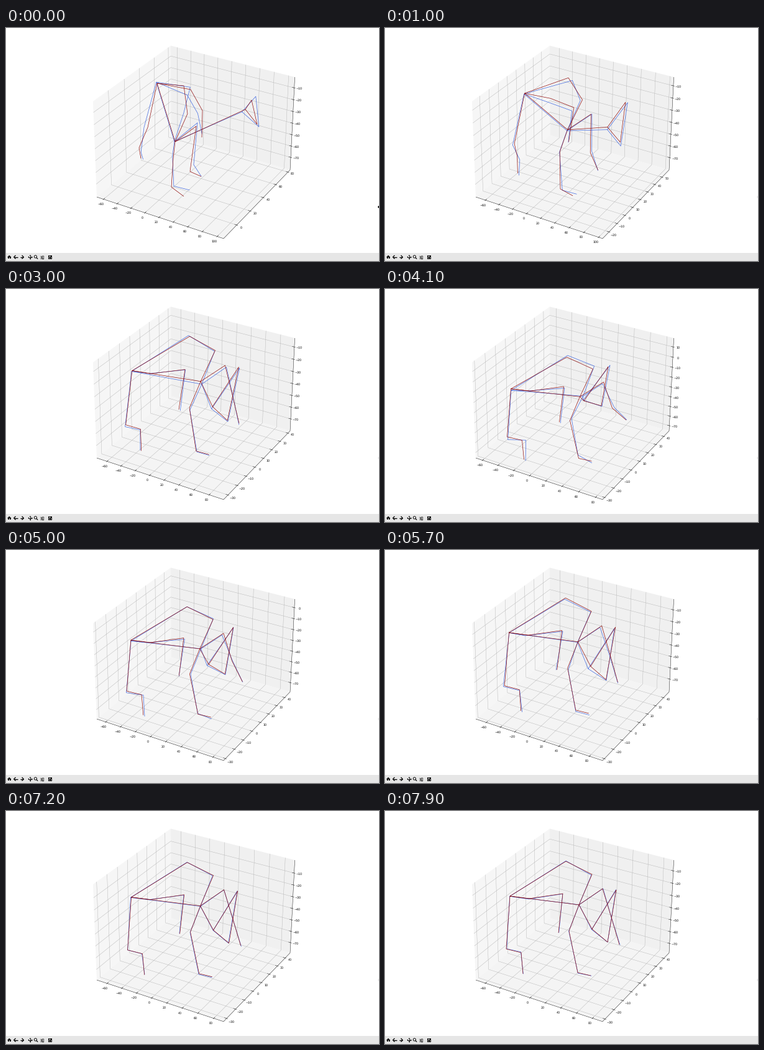
Recreate the animation shown at these times as a matplotlib script. Size 600 by 375 pixels, loop 8000 ms.

```python
import math
import numpy as np
import matplotlib.pyplot as plt
from matplotlib.animation import FuncAnimation
from matplotlib.collections import LineCollection
from matplotlib.patches import Circle, Polygon, Rectangle

W, H, DPI = 600, 375, 100
FRAMES, INTERVAL = 80, 100
PT = 72 / DPI
FONT_SIZE = 3.4
plt.rcParams["text.hinting"] = "none"

# Perspective box: origin corner, then vanishing point and weight per axis
ORIGIN = np.array([146.0, 272.0])
VANISH = np.array([[-3523, -931], [1522, -871.5], [280, 3711]], float)
WEIGHT = np.array([-0.05267, 0.0952, -0.04286])

# Joint letters: body ABCD, front leg HIJ and KLM, hind leg EFG and NOS, head RPQ
JOINTS = "ABCDHIJKLMEFGNOSRPQ"
CHAINS = ["ABCDA", "AHIJ", "AKLM", "DEFG", "DNOS", "DRPQR"]

STRIDE = np.array([
    (243, 89), (286, 93), (292, 138), (272, 183),
    (228, 160), (214, 193), (217, 210), (297, 99), (316, 133), (315, 176),
    (269, 210), (266, 256), (286, 271), (306, 158), (296, 231), (314, 239),
    (385, 131), (404, 155), (395, 116)], float)
STAND = np.array([
    (201, 137), (291, 81), (333, 102), (312, 151),
    (195, 222), (219, 228), (222, 262), (231, 141), (286, 133), (279, 196),
    (296, 193), (310, 260), (331, 265), (350, 125), (364, 171), (377, 215),
    (333, 190), (358, 211), (372, 127)], float)

rng = np.random.default_rng(4)
times, limit_keys, red_keys, blue_keys = [], [], [], []


def project(u, v, w):
    k = WEIGHT * (u, v, w)
    return (ORIGIN + k @ VANISH) / (1 + k.sum())


def sway(pose, amount):
    """Lean the figure forward and up."""
    x, y = pose.T
    lean = np.stack([0.14 * (174 - y), 0.075 * x + 0.08 * y - 42], axis=1)
    return pose + amount * lean


def crouch(pose):
    """Press the body down while the head comes up."""
    low = pose + np.stack([np.full(len(pose), 1.5),
                           36 - 0.09 * pose[:, 1]], axis=1)
    low[JOINTS.index("S")] = 388, 211
    low[JOINTS.index("R"):] = (320, 180), (348, 188), (359, 125)
    return low


def key(time, pose, limits, lean, spread):
    """The blue figure follows the red one with a lean and a random error."""
    times.append(time)
    limit_keys.append(np.array(limits))
    red_keys.append(pose)
    error = np.clip(rng.normal(0, spread, pose.shape), -2 * spread, 2 * spread)
    blue_keys.append(pose + lean + error)


key(0, STRIDE, [(-70.1, 108.5), (-18.7, 83.6), (-81.2, -1.05)], (2, -1), 5)
key(20, sway(STAND, 1), [(-78.6, 102), (-37, 36.7), (-80, -5)], (1, 4.5), 2)
key(30, sway(STAND, 0.35), [(-74.7, 98.8), (-34.7, 42.8), (-80.4, -2.85)],
    (0.5, 1.5), 1.5)
key(41, crouch(STAND), [(-68.9, 88.2), (-32.2, 47), (-75.5, 18.7)],
    (1, -0.5), 2.5)
key(57, sway(STAND, 0.1) - (2, 2.5),
    [(-75.1, 97), (-32, 47.3), (-81.5, -1)], (-1, 1.5), 1.5)
key(67, STAND + (1, 3), [(-75, 92), (-33.8, 46.1), (-79.9, 2.35)],
    (-0.7, 0.3), 0.8)
key(79, STAND, [(-73.3, 92.5), (-32.7, 46.9), (-78.1, -1.44)],
    (-0.3, 0.3), 0.8)

fig = plt.figure(figsize=(W / DPI, H / DPI), dpi=DPI, facecolor="white")
ax = fig.add_axes([0, 0, 1, 1])
ax.set_xlim(0, W)
ax.set_ylim(H, 0)
ax.axis("off")


def shape(points, color="black", z=9):
    ax.add_patch(Polygon(points, closed=True, fc=color, ec="none", zorder=z))


def block(x, y, w, h, color="black", z=9):
    ax.add_patch(Rectangle((x, y), w, h, fc=color, ec="none", zorder=z))


def stroke(points, width, color="black", z=9):
    xs, ys = zip(*points)
    ax.plot(xs, ys, color=color, lw=width * PT, zorder=z,
            solid_capstyle="butt")


def collection(color, width, z):
    lines = LineCollection([], colors=color, linewidths=width * PT, zorder=z)
    return ax.add_collection(lines, autolim=False)


def draw_box():
    left, front, right = project(0, 0, 0), project(1, 0, 0), project(1, 1, 0)
    back = project(0, 1, 0)
    left_top, back_top = project(0, 0, 1), project(0, 1, 1)
    right_top = project(1, 1, 1)
    shape([left, back, back_top, left_top], "0.965", 1)
    shape([back, right, right_top, back_top], "0.942", 1)
    shape([left, front, right, back], "0.955", 1)
    stroke([left, front, right, right_top], 0.45, z=3)


def draw_toolbar():
    block(0, 362, W, 13, "#e6e6e6", 8)
    y = 368.7
    # home
    shape([(2, y + 0.3), (5.3, y - 3), (8.6, y + 0.3)])
    block(3.2, y, 1.6, 2.7)
    block(5.9, y, 1.6, 2.7)
    # back and forward arrows
    for x, d in ((15.5, -1), (25.6, 1)):
        stroke([(x - 3 * d, y), (x + 2.6 * d, y)], 1.3)
        stroke([(x, y - 2.8), (x + 2.8 * d, y), (x, y + 2.8)], 1.3)
    # pan
    stroke([(36, y), (42, y)], 0.9)
    stroke([(39, y - 3), (39, y + 3)], 0.9)
    for dx, dy in ((1, 0), (0, 1), (-1, 0), (0, -1)):
        shape([(39 + a * dx - b * dy, y + a * dy + b * dx)
               for a, b in ((3.6, 0), (2, 1.5), (2, -1.5))])
    # zoom
    ax.add_patch(Circle((47.4, y - 0.7), 2.1, fc="none", ec="black",
                        lw=0.9 * PT, zorder=9))
    stroke([(48.9, y + 0.8), (51.2, y + 3)], 1.2)
    # sliders
    for dy, knob in ((-2.2, 59.3), (0, 56.8), (2.2, 58.8)):
        stroke([(55, y + dy), (61, y + dy)], 0.7)
        stroke([(knob, y + dy - 0.9), (knob, y + dy + 0.9)], 1)
    # save
    block(68.2, y - 3, 6, 6)
    block(69.2, y - 2.1, 3.2, 1.4, "#e6e6e6", 10)
    block(69.2, y + 0.2, 4, 2, "#e6e6e6", 10)
    block(70.4, y + 0.6, 1.5, 1.6, z=11)


draw_box()
draw_toolbar()
grid = collection("#b0b0b0", 0.42, 2)
ticks = collection("black", 0.45, 3)
blue_lines = collection("royalblue", 0.7, 5)
red_lines = collection("darkred", 0.65, 6)
pointer = ax.add_patch(Circle((600, 288), 1.8, ec="none", zorder=9))
labels = [ax.text(0, 0, "", fontsize=FONT_SIZE, family="DejaVu Sans",
                  ha="center", va="center", zorder=4) for _ in range(40)]

# Per axis: grid line path, tick ends and label offset for a fraction s
GRID = [lambda s: [(s, 0, 0), (s, 1, 0), (s, 1, 1)],
        lambda s: [(1, s, 0), (0, s, 0), (0, s, 1)],
        lambda s: [(1, 1, s), (0, 1, s), (0, 0, s)]]
TICK = [lambda s: [(s, -0.009, 0), (s, 0.017, 0)],
        lambda s: [(1.009, s, 0), (0.983, s, 0)],
        lambda s: [(1.009, 1, s), (0.983, 1, s)]]
OFFSET = [lambda s: (-4.3, 8),
          lambda s: (7.5, 5.5 - 3 * s),
          lambda s: (8, 1.5)]


def blend(keys, frame):
    i = min(int(np.searchsorted(times, frame, side="right")) - 1,
            len(times) - 2)
    f = (frame - times[i]) / (times[i + 1] - times[i])
    return keys[i] * (1 - f) + keys[i + 1] * f


def segments(pose):
    return [pose[[JOINTS.index(j) for j in chain]] for chain in CHAINS]


def tick_values(axis, low, high):
    step = 20 if axis == 0 or high - low > 95 else 10
    pad = (high - low) / 50
    return range(math.ceil((low + pad) / step) * step,
                 math.floor(high - pad) + 1, step)


def update(frame):
    # the motion pauses briefly here
    moment = 54 if 54 <= frame < 57 else frame
    grid_paths, tick_paths, texts = [], [], []
    for axis, (low, high) in enumerate(blend(limit_keys, moment)):
        for value in tick_values(axis, low, high):
            s = (value - low) / (high - low)
            path = [project(*p) for p in GRID[axis](s)]
            grid_paths.append(path)
            tick_paths.append([project(*p) for p in TICK[axis](s)])
            texts.append((path[0] + OFFSET[axis](s),
                          str(value).replace("-", "\u2212")))
    grid.set_segments(grid_paths)
    ticks.set_segments(tick_paths)
    for label in labels:
        label.set_text("")
    for label, (position, text) in zip(labels, texts):
        label.set_position(position)
        label.set_text(text)
    red_lines.set_segments(segments(blend(red_keys, moment)))
    blue_lines.set_segments(segments(blend(blue_keys, moment)))
    pointer.set_center((600, 288 if frame == 0 else 272))
    pointer.set_facecolor("black" if frame == 0 else "0.92")
    return []


anim = FuncAnimation(fig, update, frames=FRAMES, interval=INTERVAL,
                     repeat=True, repeat_delay=0, blit=False)
plt.show()
```
